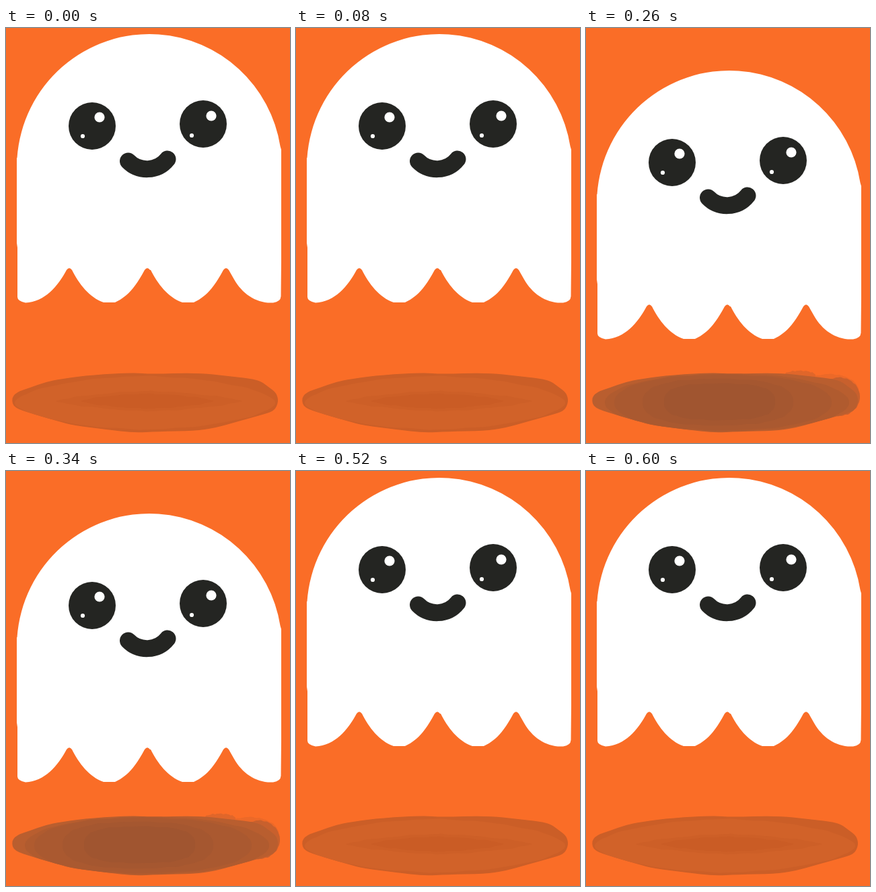
Recreate the animation shown at these times as an HTML page with a canvas. Size 422 by 614 pixels, loop 0.65 s.

```html
<!DOCTYPE html>
<html lang="en">
<head>
<meta charset="utf-8">
<title>Floating ghost</title>
<style>
  html, body { margin: 0; width: 100%; height: 100%; overflow: hidden; background: #fa6d27; }
  canvas { display: block; }
</style>
</head>
<body>
<canvas id="stage" width="422" height="614"></canvas>
<script>
const ctx = document.getElementById('stage').getContext('2d');
const STEP = 130;
const INK = '#242522';
const POSES = [
  { drop: 0, shade: 0 },
  { drop: 28, shade: 1 },
  { drop: 54, shade: 2 },
  { drop: 26, shade: 1 },
  { drop: 1, shade: 0 }
];

const SHADOW_EDGE = [
  [8, 549], [15, 539], [36, 532], [58, 524], [82, 519], [130, 513], [190, 510],
  [215, 512], [285, 510], [330, 515], [375, 520], [390, 531], [402, 540], [405, 553],
  [399, 566], [385, 571], [345, 582], [310, 592], [280, 596], [225, 597],
  [190, 599], [150, 594], [100, 588], [78, 582], [40, 571], [12, 562]
];

// Each layer: colour, left, top, right, bottom, roundness (2 is an ellipse).
const SHADES = [
  { edge: '#cb5e27', layers: [
    ['#d16229', 13, 515, 400, 594, 1.75],
    ['#cd5f27', 75, 537, 350, 567, 1.4],
    ['#ca5c25', 112, 541, 308, 563, 1.5]
  ] },
  { edge: '#c5602c', layers: [
    ['#bd5f2d', 23, 511, 391, 597, 2],
    ['#b75e2e', 37, 513, 367, 595, 2.2],
    ['#b45d2e', 78, 525, 338, 586, 2.4],
    ['#b05b2e', 140, 535, 309, 574, 3]
  ] },
  { edge: '#b95e2f', layers: [
    ['#b05b2f', 28, 511, 391, 597, 2],
    ['#aa5930', 42, 513, 365, 595, 2.2],
    ['#a55730', 84, 519, 308, 588, 2.5],
    ['#a05530', 116, 526, 281, 580, 2.8]
  ] }
];

function disc(x, y, r, color) {
  ctx.fillStyle = color;
  ctx.beginPath();
  ctx.arc(x, y, r, 0, Math.PI * 2);
  ctx.fill();
}

function smoothLoop(points) {
  const mid = (a, b) => [(a[0] + b[0]) / 2, (a[1] + b[1]) / 2];
  ctx.beginPath();
  ctx.moveTo(...mid(points[points.length - 1], points[0]));
  points.forEach((p, i) => {
    ctx.quadraticCurveTo(...p, ...mid(p, points[(i + 1) % points.length]));
  });
  ctx.closePath();
}

function brushBlob([color, left, top, right, bottom, power]) {
  const cx = (left + right) / 2, cy = (top + bottom) / 2;
  const bend = v => Math.sign(v) * Math.abs(v) ** (2 / power);
  ctx.fillStyle = color;
  ctx.beginPath();
  for (let i = 0; i < 120; i++) {
    const a = i * Math.PI / 60;
    const wobble = 0.4 * Math.sin(a * 13) + 0.3 * Math.sin(a * 23 + 1);
    ctx.lineTo(cx + (right - left) / 2 * bend(Math.cos(a)),
               cy + (bottom - top) / 2 * bend(Math.sin(a)) + wobble);
  }
  ctx.closePath();
  ctx.fill();
}

function drawShadow(level) {
  const { edge, layers } = SHADES[level];
  if (level > 0) brushBlob(['#ec6928', 318, 512, 405, 560, 2]);
  if (level > 1) {
    brushBlob(['#e0662a', 294, 507, 341, 521, 2]);
    brushBlob(['#c8602d', 345, 517, 407, 574, 2]);
  }
  ctx.save();
  smoothLoop(SHADOW_EDGE);
  ctx.fillStyle = edge;
  ctx.fill();
  ctx.clip();
  layers.forEach(brushBlob);
  ctx.restore();
}

function drawBody() {
  ctx.fillStyle = '#fff';
  ctx.beginPath();
  ctx.moveTo(17, 398);
  ctx.lineTo(17, 325);
  ctx.lineTo(16, 318);
  ctx.lineTo(16, 192);
  ctx.arc(213, 206, 197, Math.PI + 0.07, -0.158);
  ctx.lineTo(409, 180);
  ctx.lineTo(409, 345);
  ctx.lineTo(408.5, 397);
  ctx.quadraticCurveTo(408, 405, 397, 406.5);
  ctx.bezierCurveTo(372, 408, 351, 393, 339, 372);
  for (const x of [327, 210, 94]) {
    ctx.lineTo(x + 4, 358);
    ctx.quadraticCurveTo(x, 352.5, x - 4, 358);
    if (x > 94) {
      ctx.bezierCurveTo(x - 15, 378, x - 26, 396, x - 48, 406);
      ctx.lineTo(x - 65, 406);
      ctx.bezierCurveTo(x - 86, 399, x - 102, 378, x - 112, 358);
    }
  }
  ctx.bezierCurveTo(77, 382, 58, 405, 29, 406.5);
  ctx.quadraticCurveTo(17, 404, 17, 398);
  ctx.fill();
}

function drawEye(x, y, glintX, glintY, dotX, dotY) {
  disc(x, y, 35, INK);
  disc(glintX, glintY, 7.6, '#fff');
  disc(dotX, dotY, 3.1, '#fff');
}

function drawMouth() {
  ctx.strokeStyle = INK;
  ctx.lineWidth = 25;
  ctx.lineCap = 'round';
  ctx.beginPath();
  ctx.moveTo(181.5, 197);
  ctx.bezierCurveTo(197, 213, 225, 213, 240, 194);
  ctx.stroke();
}

function render(now) {
  const pose = POSES[Math.floor(now / STEP) % POSES.length];
  ctx.fillStyle = '#fa6d27';
  ctx.fillRect(0, 0, 422, 614);
  drawShadow(pose.shade);
  ctx.save();
  ctx.translate(0, pose.drop);
  drawBody();
  drawEye(128, 145, 139, 132, 114, 160);
  drawEye(293, 142, 305, 130, 276, 159);
  drawMouth();
  ctx.restore();
}

const start = performance.now();
function tick() {
  render(performance.now() - start);
  requestAnimationFrame(tick);
}
tick();
</script>
</body>
</html>
```
